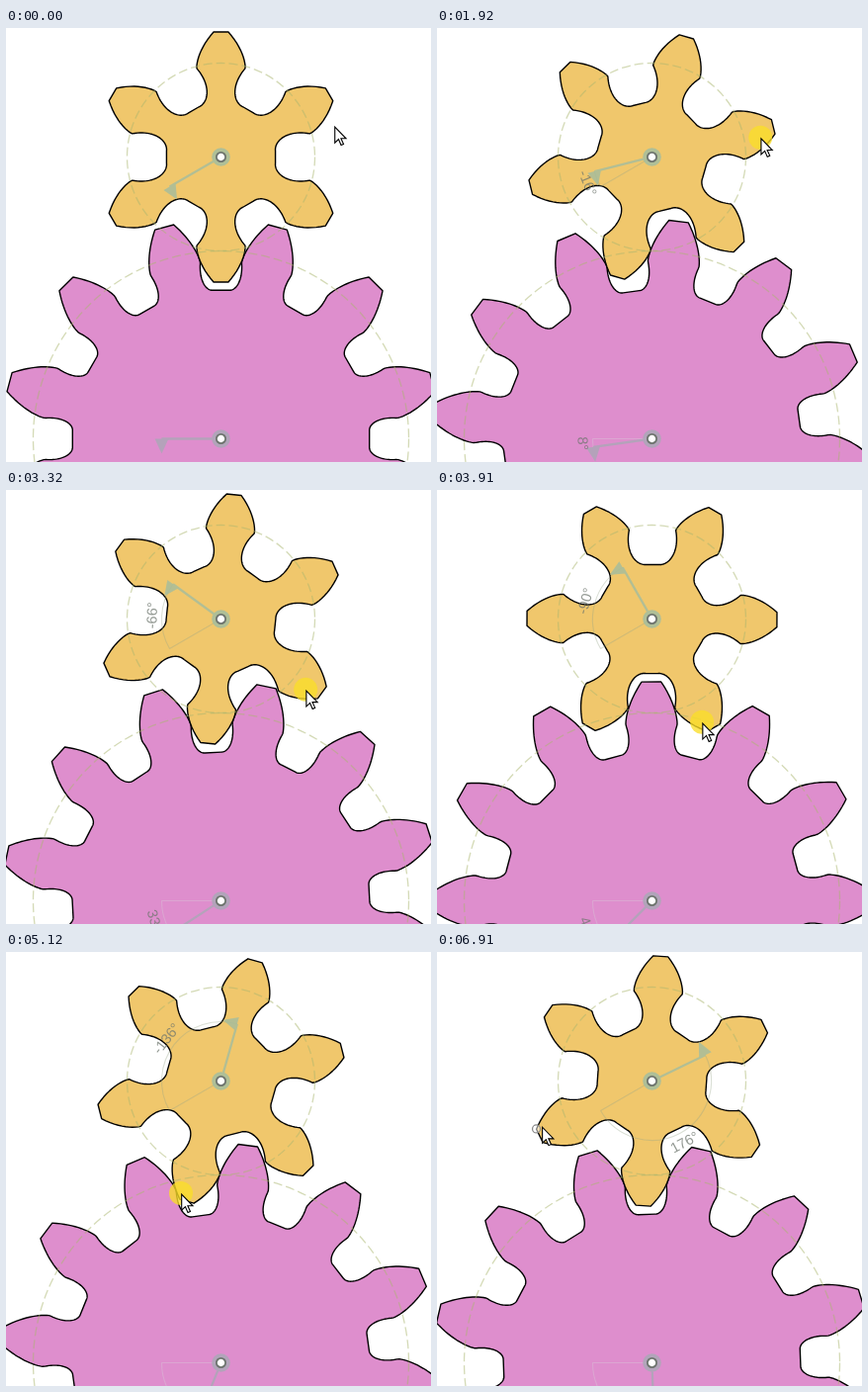
Animation, 430 px wide and 439 px high, one loop 8 s. Source, as an HTML page:

```html
<!DOCTYPE html>
<html lang="en">
<head>
<meta charset="utf-8">
<title>Meshing gears</title>
<style>
  html, body { margin: 0; width: 100%; height: 100%; overflow: hidden; background: #fff; }
  svg { display: block; }
  .gear { stroke: #000; stroke-width: 1.4; stroke-linejoin: round; }
  .pitch { fill: none; stroke: #a9b56e; stroke-opacity: .5; stroke-width: 1.3; stroke-dasharray: 9 4; }
  .thin { fill: none; stroke-width: 1.1; stroke-opacity: .35; }
  .arm { stroke-width: 2.3; opacity: .8; }
  text { font: 14.5px "Liberation Sans", Arial, sans-serif; text-anchor: middle; fill: #6d756d; fill-opacity: .75; }
</style>
</head>
<body>
<svg id="stage" width="430" height="439" viewBox="0 0 430 439"></svg>
<script>
const LOOP = 8000, START = 500, STEP = 200, PRESS = 1100, RELEASE = 6900;
const CX = 217.5, TOP_Y = 130.5, LOW_Y = 415.5;
const MODULE = 95 / 3, PRESSURE = rad(20);
const stage = document.getElementById('stage');

function rad(a) { return a * Math.PI / 180; }
const lerp = (a, b, f) => a + (b - a) * Math.min(1, Math.max(0, f));
const polar = (r, a) => [r * Math.cos(rad(a)), r * Math.sin(rad(a))];

function set(el, attrs) {
  for (const name in attrs) el.setAttribute(name, attrs[name]);
}

function add(tag, attrs, parent = stage) {
  const el = document.createElementNS('http://www.w3.org/2000/svg', tag);
  set(el, attrs);
  return parent.appendChild(el);
}

const show = (el, on) => set(el, { visibility: on ? 'visible' : 'hidden' });

// Half the angle of the gap at radius r, as a straight rack would cut it.
function gapAngle(r, pitch, root) {
  const base = pitch * Math.cos(PRESSURE);
  const inv = a => Math.tan(a) - a;
  const tip = MODULE * (Math.PI / 4 - 1.25 * Math.tan(PRESSURE));
  const v = Math.sqrt(Math.max(0, r * r - root * root));
  const undercut = Math.atan2(v, root) - (v - tip) / pitch;
  if (r < base) return undercut;
  const flank = MODULE * Math.PI / 4 / pitch - inv(PRESSURE) + inv(Math.acos(base / r));
  return Math.max(flank, undercut);
}

function gearPath(teeth, phase) {
  const pitch = MODULE * teeth / 2, tip = pitch + MODULE, root = pitch - 1.25 * MODULE;
  const half = [];
  for (let i = 0; i <= 40; i++) {
    const r = root + (tip - root) * (i / 40) ** 2;
    half.push([r, Math.PI / teeth - gapAngle(r, pitch, root)]);
  }
  const tooth = half.map(([r, a]) => [r, -a]).concat(half.reverse());
  const points = [];
  for (let n = 0; n < teeth; n++) {
    const mid = rad(phase + n * 360 / teeth - 90);
    for (const [r, a] of tooth) {
      points.push((r * Math.cos(mid + a)).toFixed(2) + ' ' + (r * Math.sin(mid + a)).toFixed(2));
    }
  }
  return 'M' + points.join('L') + 'Z';
}

function makeGear(y, teeth, phase, fill) {
  const g = add('g', { transform: `translate(${CX} ${y})` });
  return add('path', { class: 'gear', d: gearPath(teeth, phase), fill }, g);
}

// Arm, reference line, arc and angle label around one gear centre.
function makeGauge(y, zero, pitch, color, thin) {
  const g = add('g', { transform: `translate(${CX} ${y})` });
  add('circle', { class: 'pitch', r: pitch }, g);
  const ref = add('path', { class: 'thin', stroke: thin, d: 'M0 0H60', transform: `rotate(${zero})` }, g);
  const arc = add('path', { class: 'thin', stroke: thin }, g);
  const arm = add('g', { class: 'arm', stroke: color, fill: color }, g);
  add('path', { d: 'M9 0H60' }, arm);
  add('path', { d: 'M53 0H67L60 -15Z', stroke: 'none' }, arm);
  const label = add('text', { dy: 5 }, g);
  add('circle', { r: 9.3, fill: color, 'fill-opacity': .85 }, g);
  add('circle', { r: 4.6, fill: '#fff', stroke: '#6e746e', 'stroke-width': 1.8 }, g);

  return turn => {
    const wide = Math.abs(turn) > 180;
    const signed = wide ? turn - 360 * Math.sign(turn) : turn;
    const mid = zero + signed / 2;
    const tilt = Math.sin(rad(mid)) > 0 ? mid - 90 : mid + 90;
    for (const el of [ref, arc, label]) show(el, Math.abs(turn) > 0.4);
    set(arm, { transform: `rotate(${zero + turn})` });
    set(arc, { d: `M${polar(60, zero)}A60 60 0 0 ${signed > 0 ? 1 : 0} ${polar(60, zero + turn)}` });
    set(label, { transform: `translate(${polar(70, mid)}) rotate(${tilt})` });
    label.textContent = Math.round(-signed) + '°';
  };
}

const big = makeGear(LOW_Y, 12, 15, '#de8ecd');
const small = makeGear(TOP_Y, 6, 0, '#f0c76c');
const lowGauge = makeGauge(LOW_Y, 180, 190, '#aaa8b6', '#d8d0da');
const topGauge = makeGauge(TOP_Y, 150, 95, '#a3bd9f', '#94a488');

const handle = add('circle', { r: 4, fill: '#fff', 'fill-opacity': .5, stroke: '#8a8a8a', 'stroke-width': 1.3 });
const glow = add('circle', { r: 12, fill: '#fade28', 'fill-opacity': .78 });
const arrow = add('path', {
  d: 'M0 0V16L3.7 12.4L6.3 18.4L8.8 17.3L6.2 11.6H11.3Z',
  fill: '#fff', stroke: '#000', 'stroke-width': 1.1
});

// Drag of the small gear: time, degrees
const DRAG = [[1300, 0], [1900, 16], [2500, 36], [3300, 66], [4500, 114], [5900, 162], [6900, 184]];

// Smooth curve through the drag points, at rest at both ends.
function turnAt(t) {
  const end = DRAG.length - 1;
  if (t <= DRAG[0][0]) return 0;
  if (t >= DRAG[end][0]) return DRAG[end][1];
  const slope = i => i === 0 || i === end ? 0 :
    (DRAG[i + 1][1] - DRAG[i - 1][1]) / (DRAG[i + 1][0] - DRAG[i - 1][0]);
  const i = DRAG.findIndex(k => k[0] > t) - 1;
  const [t0, a] = DRAG[i], [t1, b] = DRAG[i + 1];
  const w = t1 - t0, f = (t - t0) / w, s = f * f * (3 - 2 * f);
  return a + (b - a) * s + w * f * (1 - f) * (slope(i) * (1 - f) - slope(i + 1) * f);
}

function draw(time) {
  const t = time % LOOP;
  const held = t < START ? 0 : Math.min(RELEASE, START + Math.floor((t - START) / STEP) * STEP);
  const turn = turnAt(held);

  set(small, { transform: `rotate(${turn})` });
  set(big, { transform: `rotate(${-turn / 2})` });
  topGauge(turn);
  lowGauge(-turn / 2);

  // The pointer moves onto a tooth, then drags it round, drifting outwards.
  const reach = (held - 300) / (PRESS - 300);
  const lead = lerp(-15.4, -26.2, reach);
  const r = lerp(118.8, 111.5, reach) + lerp(0, 9, (held - 3300) / 1200);
  const [x, y] = polar(r, turn + lead);
  const [hx, hy] = polar(126.6, turn - 26.5);
  const pressed = held >= PRESS && held < RELEASE;
  set(arrow, { transform: `translate(${CX + x + 0.7} ${TOP_Y + y + 1.2})` });
  set(glow, { cx: CX + x, cy: TOP_Y + y });
  set(handle, { cx: CX + hx, cy: TOP_Y + hy });
  show(glow, pressed);
  show(handle, held >= 900 && !pressed);
}

const origin = performance.now();
function tick() {
  draw(performance.now() - origin);
  requestAnimationFrame(tick);
}
tick();
</script>
</body>
</html>
```
